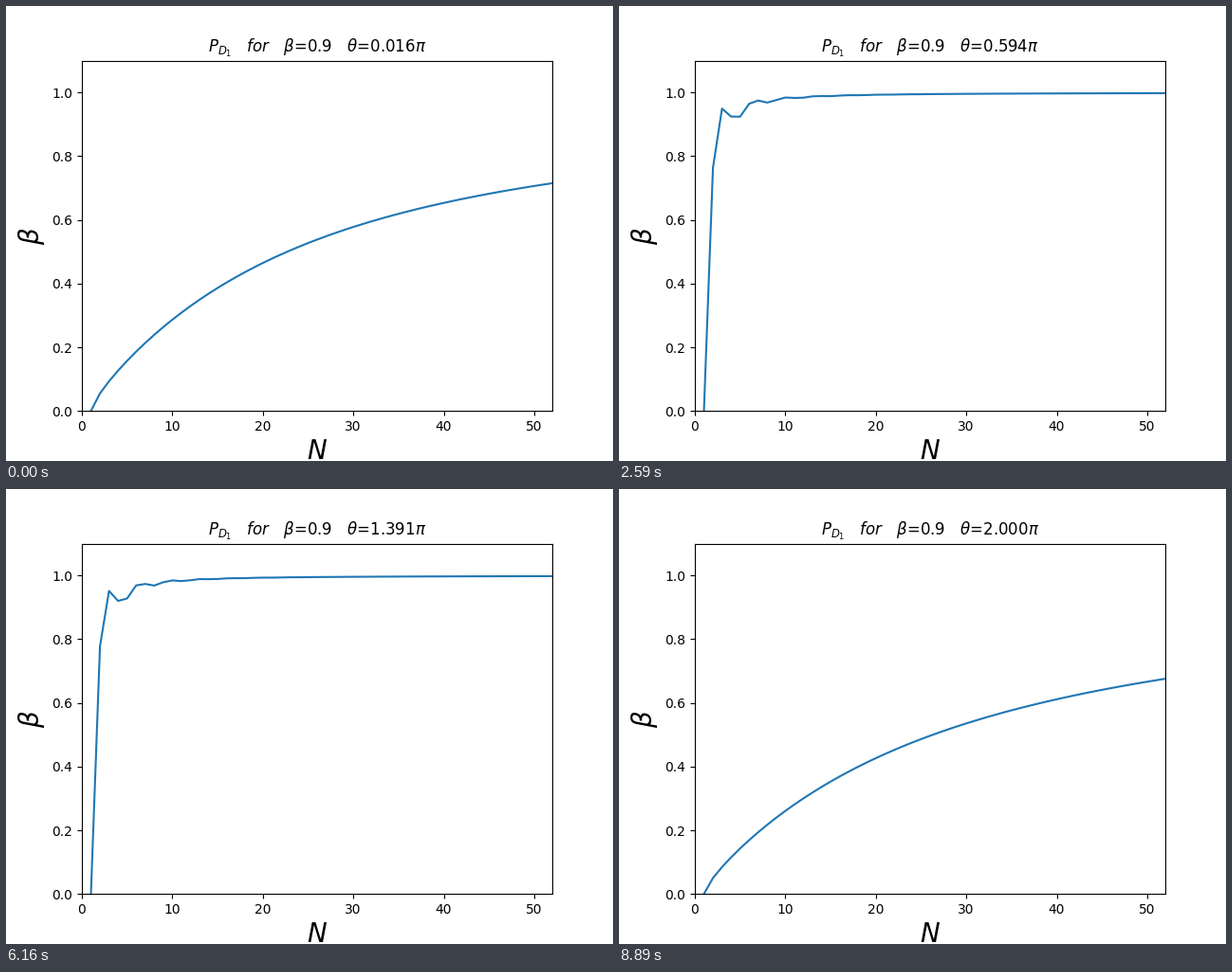
A matplotlib script that plays this animation: 640 by 480 pixels, repeating every 8960 ms.

```python
import numpy as np
import matplotlib.pyplot as plt
from matplotlib.animation import FuncAnimation

BETA = 0.9
FRAMES = 128
INTERVAL = 70
N_MAX = 53

steps = np.arange(1, N_MAX + 1)


def survival(n, g):
    """Amplitude left in the first arm after n rotations by pi/2n,
    with the second arm scaled by g between rotations."""
    c, s = np.cos(np.pi / (2 * n)), np.sin(np.pi / (2 * n))
    a, b = 1, 0
    for _ in range(n):
        a, b = c * a - s * b, g * (s * a + c * b)
    return abs(a)


fig, ax = plt.subplots(figsize=(6.4, 4.8), dpi=100)
line, = ax.plot([], [])
ax.set_xlim(0, 52)
ax.set_ylim(0, 1.1)
ax.set_xlabel(r"$N$", fontsize=20)
ax.set_ylabel(r"$\beta$", fontsize=20)
title = ax.set_title("")


def update(i):
    turn = 2 * (i + 1) / FRAMES
    g = BETA * np.exp(1j * np.pi * turn)
    line.set_data(steps, [survival(n, g) for n in steps])
    title.set_text(rf"$P_{{D_1}}$   $for$   $\beta$={BETA}   $\theta$={turn:.3f}$\pi$")
    return line, title


anim = FuncAnimation(fig, update, frames=FRAMES, interval=INTERVAL,
                     init_func=lambda: update(0), repeat=True, repeat_delay=0)
plt.show()
```
